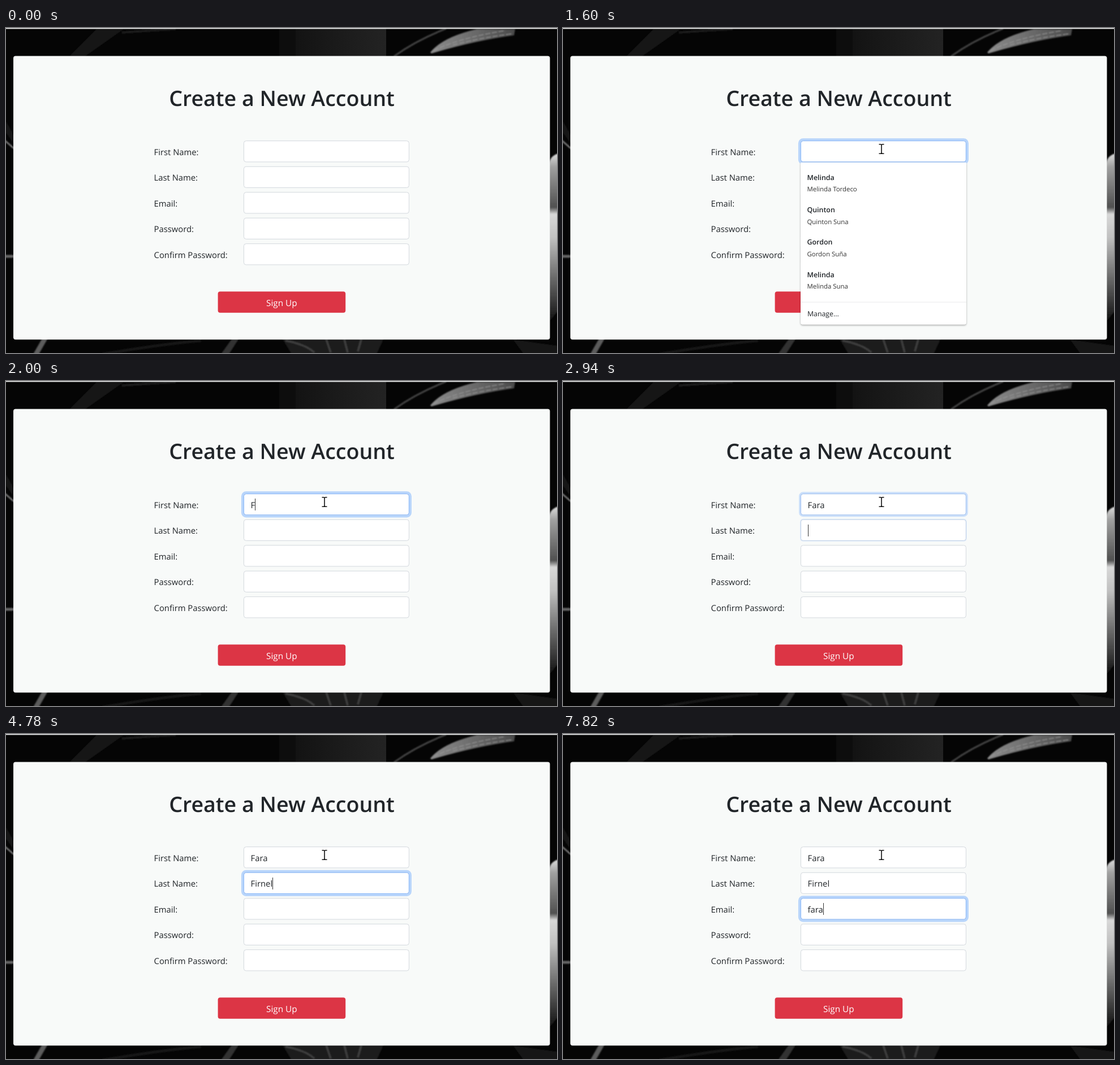
Recreate the animation shown at these times as an HTML page. Size 974 by 575 pixels, loop 8000 ms.

```html
<!DOCTYPE html>
<html lang="en">
<head>
<meta charset="utf-8">
<title>Create a New Account</title>
<style>
  html, body { margin: 0; width: 100%; height: 100%; overflow: hidden; background: #050505; }
  svg { display: block; width: 974px; height: 575px; }
  text {
    font: 14.8px "Open Sans", "Noto Sans", sans-serif;
    fill: #212529;
    text-rendering: geometricPrecision;
  }
  .title { font-size: 37.6px; font-weight: 600; text-anchor: middle; }
  .button { font-size: 15.3px; fill: #fff; text-anchor: middle; }
  .name { font-size: 12.4px; font-weight: 600; }
  .full { font-size: 11.4px; fill: #333; }
  .manage { font-size: 12.3px; }
</style>
</head>
<body>
<svg viewBox="0 0 974 575" xmlns="http://www.w3.org/2000/svg">
  <defs>
    <filter id="soft" x="-10%" y="-10%" width="120%" height="120%"><feGaussianBlur stdDeviation="1"/></filter>
    <filter id="shadow" x="-5%" y="-5%" width="110%" height="110%">
      <feDropShadow dx="0" dy="1.5" stdDeviation="1.6" flood-opacity=".35"/>
    </filter>
    <linearGradient id="wall"><stop offset="0" stop-color="#131313"/><stop offset="1" stop-color="#232323"/></linearGradient>
    <linearGradient id="ray"><stop offset="0" stop-color="#8c8c8c"/><stop offset="1" stop-color="#4a4a4a"/></linearGradient>
    <linearGradient id="hand" x2="0" y2="1">
      <stop offset="0" stop-color="#dcdcdc"/><stop offset=".08" stop-color="#a0a0a0"/>
      <stop offset=".32" stop-color="#505050"/><stop offset=".36" stop-color="#d8d8d8"/>
      <stop offset=".5" stop-color="#c0c0c0"/><stop offset=".75" stop-color="#666"/>
      <stop offset="1" stop-color="#101010"/>
    </linearGradient>
  </defs>

  <!-- dim photo behind the card -->
  <rect width="974" height="575" fill="#050505"/>
  <rect x="483" width="30" height="52" fill="#0d0d0d"/>
  <rect x="512" width="160" height="52" fill="url(#wall)"/>
  <g filter="url(#soft)">
    <path d="M112 50L160 2h48L140 50z" fill="#151515"/>
    <path d="M205 8Q255 4 300 2" stroke="#1c1c1c" stroke-width="4" fill="none"/>
    <path d="M686 50Q725 22 778 1" stroke="#424242" stroke-width="3" fill="none"/>
    <path d="M750 43Q772 16 832 2H900L898 13Q830 22 752 45z" fill="url(#ray)"/>
    <path d="M756 40Q800 18 880 5M790 30Q840 17 896 10" stroke="#a0a0a0" stroke-dasharray="9 3" fill="none"/>
    <path d="M-2 199L15 214" stroke="#808080" stroke-width="2.5"/>
    <path d="M0 165L14 190V205L0 185z" fill="#181818"/>
    <path d="M-2 404H14" stroke="#666" stroke-width="5"/>
    <path d="M976 222Q962 226 960 240V520L976 500z" fill="url(#hand)"/>
    <path d="M48 577L64 549H74L58 577z" fill="#5c5c5c"/>
    <path d="M380 577L400 549H412L394 577z" fill="#333"/>
    <path d="M488 549H668L655 577H505z" fill="#1e1e1e"/>
    <path d="M494 553Q530 560 545 574M566 551L574 574M598 551L604 574M628 551L622 572" stroke="#414141" stroke-width="3" fill="none"/>
    <path d="M170 577Q270 560 345 553" stroke="#181818" stroke-width="5" fill="none"/>
    <path d="M896 551L915 577H974V562z" fill="#131313"/>
  </g>
  <rect width="974" height="1.6" fill="#e9ebeb"/>

  <rect x="13" y="49.5" width="948.5" height="501.7" rx="4" fill="#f8faf9"/>
  <text class="title" x="487.5" y="137.5">Create a New Account</text>
  <g id="form"></g>
  <rect x="374.6" y="466.3" width="225.6" height="37.4" rx="4" fill="#dc3545"/>
  <text class="button" x="487.3" y="492">Sign Up</text>

  <g id="menu">
    <path d="M420 238H713V520.5Q713 524.5 709 524.5H424Q420 524.5 420 520.5z" fill="#fff" filter="url(#shadow)"/>
    <path d="M420 485H713" stroke="#e8e9ea"/>
    <text class="manage" x="432" y="510">Manage...</text>
  </g>

  <rect id="caret" y="208" width="1" height="21" fill="#333"/>
  <g id="mouse">
    <path id="beam" d="M-4.5-8.3H-2Q0-8.3 0-6.5Q0-8.3 2-8.3H4.5M0-6.5V6.5M-4.5 8.3H-2Q0 8.3 0 6.5Q0 8.3 2 8.3H4.5"
          fill="none" stroke="#111" stroke-width="1.6"/>
    <path id="arrow" d="M0 0V16L3.8 12.5L6.2 18L8.6 17L6.2 11.6H11.3z" fill="#fff" stroke="#111"/>
    <circle id="click" cx="-1" cy="-1" r="12" fill="#ff0" opacity=".55"/>
  </g>
</svg>

<script>
const LOOP = 8000, FADE = 60, ROW = 45.5;
const $ = id => document.getElementById(id);

function add(parent, tag, attrs, text = '') {
  const el = document.createElementNS('http://www.w3.org/2000/svg', tag);
  for (const key in attrs) el.setAttribute(key, attrs[key]);
  el.textContent = text;
  return parent.appendChild(el);
}

const rows = [
  { label: 'First Name:', text: 'Fara', focus: 1036, blur: 2920, keys: [1810, 2060, 2150, 2460] },
  { label: 'Last Name:', text: 'Firnel', focus: 2920, blur: 5690, keys: [3450, 3660, 4240, 4470, 4660, 4780] },
  { label: 'Email:', text: 'fara', focus: 5690, blur: Infinity, keys: [7090, 7280, 7410, 7820] },
  { label: 'Password:' },
  { label: 'Confirm Password:' }
];
const people = [
  ['Melinda', 'Tordeco'], ['Quinton', 'Suna'], ['Gordon', 'Suña'], ['Melinda', 'Suna']
];
const caretOff = [[0, 1036], [1600, 1810], [5330, 5690], [6240, 6740]];
// time, x, y of the pointer
const path = [[250, 690, 320], [440, 662, 262], [620, 614, 172], [700, 596, 159], [800, 578, 182], [930, 563, 214]];

rows.forEach((row, i) => {
  const y = 199.7 + i * ROW, box = { x: 420.4, y, width: 292, height: 37.2, rx: 4, fill: 'none' };
  add($('form'), 'text', { x: 261.6, y: 224.9 + i * ROW }, row.label);
  add($('form'), 'rect', { ...box, fill: '#fff', stroke: '#d3d8dd' });
  if (!row.text) return;
  row.glow = add($('form'), 'rect', { ...box, stroke: '#0d6efd' });
  row.edge = add($('form'), 'rect', { ...box, stroke: '#86b7fe' });
  row.value = add($('form'), 'text', { x: 432.6, y: 224.9 + i * ROW });
});

people.forEach(([first, last], i) => {
  const y = 268.7 + i * 57.3;
  add($('menu'), 'text', { class: 'name', x: 431.5, y }, first);
  add($('menu'), 'text', { class: 'full', x: 431.5, y: y + 20.5 }, first + ' ' + last);
});

const clamp = v => Math.max(0, Math.min(1, v));
const ease = v => (v = clamp(v), v * v * (3 - 2 * v));
const show = (el, on) => el.setAttribute('visibility', on ? 'visible' : 'hidden');

function drawRow(row, i, t) {
  const p = ease((t - row.focus) / FADE) - ease((t - row.blur) / FADE);
  const grow = 4 * p, off = .5 + grow / 2;
  const size = {
    x: 420.4 - off, y: 199.7 + i * ROW - off,
    width: 292 + 2 * off, height: 37.2 + 2 * off,
    rx: 4 + off, 'stroke-width': grow, opacity: .27 * p
  };
  for (const key in size) row.glow.setAttribute(key, size[key]);
  row.edge.setAttribute('opacity', p);

  const typed = row.text.slice(0, row.keys.filter(k => k <= t).length);
  if (row.value.textContent !== typed) row.value.textContent = typed;
  if (t >= row.focus && t < row.blur) {
    const w = typed ? row.value.getComputedTextLength() : 0;
    $('caret').setAttribute('x', Math.round(432.8 + w));
    $('caret').setAttribute('y', Math.round(208 + i * ROW));
  }
}

function drawMouse(t) {
  let n = 0;
  while (n < path.length - 2 && t > path[n + 1][0]) n++;
  const [a, b] = [path[n], path[n + 1]];
  const k = clamp((t - a[0]) / (b[0] - a[0]));
  const x = a[1] + (b[1] - a[1]) * k, y = a[2] + (b[2] - a[2]) * k;
  const inField = y > 199 && (y - 199.7) % ROW < 37.5;
  $('mouse').setAttribute('transform', `translate(${x} ${y})`);
  show($('beam'), t >= 250 && inField);
  show($('arrow'), t >= 250 && !inField);
  show($('click'), t >= 930 && t < 1110);
}

function draw(t) {
  rows.forEach((row, i) => row.text && drawRow(row, i, t));
  drawMouse(t);
  show($('caret'), !caretOff.some(([from, to]) => t >= from && t < to));
  show($('menu'), t >= 1210 && t < 1990);
  $('menu').setAttribute('opacity', 1 - clamp((t - 1860) / 130));
}

function tick() {
  draw(performance.now() % LOOP);
  requestAnimationFrame(tick);
}
tick();
</script>
</body>
</html>
```
